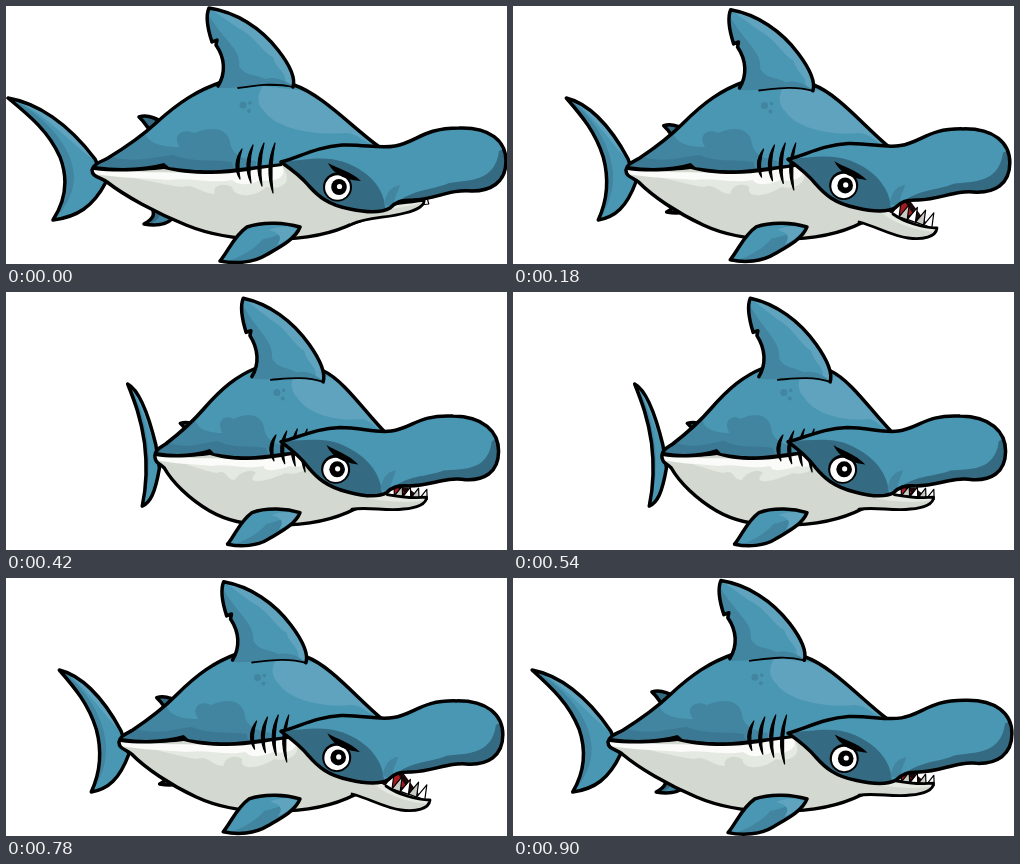
Animation of 501 by 258 pixels, one loop 0.96 s. Source, as an HTML page with a canvas:

```html
<!DOCTYPE html>
<html lang="en">
<head>
<meta charset="utf-8">
<title>Hammerhead</title>
<style>
html, body { margin: 0; width: 100%; height: 100%; overflow: hidden; background: #fff; }
canvas { display: block; }
</style>
</head>
<body>
<canvas id="stage" width="501" height="258"></canvas>
<script>
const ctx = document.getElementById('stage').getContext('2d');
const STEP = 60, STEPS = 16;
const MAIN = '#4a97b4', DARK = '#346b82', LIGHT = '#5fa3be', MID = '#4285a1';
const GREY = '#d3d9d0', SOFT = '#e4e9e1', PALE = '#fbfcfa', INK = '#000';
const OPENING = [0, .4, .85, 1, 1, 1, .85, .4, 0];

let s = 0;     // how far the body is turned, 0 to 8
let open = 0;  // how far the jaw is dropped, 0 to 1

const clamp = v => Math.max(0, Math.min(1, v));

function ramp(stops, x) {
  let i = 1;
  while (i < stops.length - 1 && x > stops[i][0]) i++;
  const [a, b] = stops[i - 1], [c, d] = stops[i];
  return b + (d - b) * (x - a) / (c - a);
}

// Sideways travel per step along the back and along the belly
const BACK = [[0, 17.2], [90, 8.6], [160, 6.5], [213, 4.9], [250, 4.8], [290, 4.2], [370, 1], [500, -1]];
const BELLY = [[90, 8.6], [137, 5.4], [165, 4], [215, 2], [260, .5], [500, -.5]];

const back = (x, y) => [x + s * ramp(BACK, x), y];
const body = (x, y) => {
  const t = clamp((y - 172) / 20);
  return [x + s * (ramp(BACK, x) * (1 - t) + ramp(BELLY, x) * t), y];
};
const tail = (x, y) => [x + s * (8.6 + (90 - x) * .0966), y];
const dorsal = (x, y) => [x + s * (4.9 - (x - 203) * .007), y + s * (.6 + (x - 203) * .008)];
const farTop = (x, y) => [x + s * 5.9, y + s * 2.9];
const farLow = (x, y) => [x + s * 5.2, y - s * 4];
const pectoral = (x, y) => [x + s * (294 - x) * .0135, y - s * .4 * clamp((y - 215) / 40)];
const head = (x, y) => [x - s * (x - 275) * .0047, y + s * (-.9 + (x - 275) * .0067)];

const PAIR = /(-?[\d.]+) (-?[\d.]+)/g;
const bend = (d, warp) => new Path2D(d.replace(PAIR, (_, x, y) => warp(+x, +y).join(' ')));

function blend(a, b, t) {
  const to = b.match(/-?[\d.]+/g);
  let i = 0;
  return new Path2D(a.replace(/-?[\d.]+/g, n => +n + (to[i++] - n) * t));
}

function fill(path, colour) {
  ctx.fillStyle = colour;
  ctx.fill(path);
}

function line(path, width) {
  ctx.lineWidth = width;
  ctx.strokeStyle = INK;
  ctx.stroke(path);
}

function part(outline, warp, colour, shades = [], edge = outline) {
  const path = bend(outline, warp);
  fill(path, colour);
  ctx.save();
  ctx.clip(path);
  for (const [d, c] of shades) fill(bend(d, warp), c);
  ctx.restore();
  line(bend(edge, warp), 3.5);
}

function drawTail() {
  part('M2 92 C31 97 62 117 89 153 L100 176 C87 201 71 211 47 214 C60 194 62 172 54 151 C43 126 24 110 2 92Z', tail, MAIN, [
    ['M0 90 C35 106 67 139 68 170 C68 190 58 204 44 218 L50 190 L50 150Z', MID],
    ['M14 96 C42 104 67 126 88 154 C65 137 43 112 14 96Z', LIGHT]
  ]);
}

function drawFarFins() {
  part('M133 111 C142 108 153 113 160 120 L150 130 C141 124 142 119 133 111Z', farTop, DARK);
  part('M145 200 L171 206 C166 217 154 221 138 218 C147 213 150 209 145 200Z', farLow, MID,
    [['M140 198 L156 200 C156 211 150 217 137 220Z', DARK]]);
}

function drawBody() {
  part('M86 164 C88 157 95 156 102 152 C120 141 137 129 150 117 C173 96 192 84 216 76 L288 79 C315 88 345 120 372 140 L400 170 L385 205 C372 208 359 213 348 217 C322 230 290 234 258 233 C227 233 202 228 180 219 C150 207 119 190 101 176 C94 171 86 171 86 164Z', body, MAIN, [
    ['M257 80 C250 90 251 99 259 106 C269 121 304 130 339 127 C352 127 360 138 375 143 L340 90Z', LIGHT],
    ['M84 166 L140 118 C134 135 152 141 174 141 C165 129 177 122 188 127 C208 119 222 123 224 136 C226 151 240 153 250 155 L250 172 L85 172Z', MID],
    ['M85 164 L102 150 C130 158 148 151 167 149 C188 157 209 153 226 156 L230 172 L85 172Z', '#3b7893'],
    ['M84 163 C120 167 143 163 158 160 C185 166 205 168 226 165 L276 158 L340 165 L410 200 L400 245 L80 245Z', GREY],
    ['M88 164 C125 168 188 166 226 166 L276 160 C289 178 274 184 260 181 C249 192 228 192 226 181 C215 176 206 180 209 188 C196 188 187 177 176 181 C157 179 128 171 88 164Z', SOFT],
    ['M88 163 C125 168 188 166 226 166 L276 160 C282 172 267 177 254 174 C246 179 233 180 226 174 C205 178 184 171 162 174 C138 172 113 172 88 168Z', PALE]
  ]);
  fill(bend('M88 160 C120 164 141 161 158 157 L163 161 C190 165 207 165 225 163 L276 157 L276 160 C250 163 230 168 205 168 C185 168 170 166 158 163 C140 165 110 167 88 164Z', back), INK);
  for (const [x, y, r] of [[237, 99, 3.5], [243, 105, 2], [244, 97, 1.8]]) {
    const [cx, cy] = back(x, y);
    ctx.beginPath();
    ctx.arc(cx, cy + s * .2, r, 0, 7);
    ctx.fillStyle = MID;
    ctx.fill();
  }
}

function drawGills() {
  for (const [x, y, h] of [[231, 143, 30], [242, 139, 38], [253, 137, 43], [264, 137, 50]]) {
    const slit = bend(`M${x + 5} ${y} Q${x - 6} ${y + h * .5} ${x + 3} ${y + h} Q${x} ${y + h * .5} ${x + 5} ${y}Z`,
      (px, py) => [px + s * ramp(BACK, x), py - s * (py - y) * .02]);
    fill(slit, INK);
    line(slit, 1.2);
  }
}

function drawDorsal() {
  const rim = 'M212 80 C220 67 219 52 210 39 L211 34 L206 36 C202 24 199 11 203 2 C230 6 255 22 272 44 C283 58 290 71 287 81';
  part(rim + ' C264 75 241 83 212 82Z', dorsal, MAIN, [
    ['M203 2 L260 20 L294 84 L279 78 C282 66 270 64 267 51 C256 46 249 30 232 22Z', LIGHT],
    ['M198 0 C212 31 236 42 233 60 C240 71 247 67 259 73 C271 70 280 75 290 82 L205 90Z', MID]
  ], rim);
  ctx.save();
  line(bend('M287 81 C267 76 248 80 232 82', dorsal), 1.8);
  ctx.restore();
}

function drawPectoral() {
  part('M214 255 C223 244 228 230 241 221 C258 215 280 217 294 221 C289 234 272 242 260 249 C247 257 229 258 214 255Z', pectoral, MAIN, [
    ['M208 260 C231 253 247 245 257 233 C267 232 275 226 296 224 L280 248 L240 264Z', MID],
    ['M263 224 C271 220 282 219 291 223 C287 230 280 235 271 239 C277 231 274 227 263 224Z', LIGHT]
  ]);
}

function drawMouth() {
  fill(blend('M360 203 L390 195 L404 195 L413 196 L386 200Z',
    'M366 201 L388 194 L398 196 L415 219 L388 213Z', open), '#1c0808');
  fill(blend('M380 198 L390 195 L398 195 L390 198Z', 'M382 203 L392 196 L400 208 L389 211Z', open), '#a51c20');

  for (let i = 0; i < 5; i++) {
    const x = 380 + i * 8.2, y = 208 + i * 2.7;
    const tooth = blend(`M${x + 2} 199 L${x + 8} 191 L${x + 10} 198Z`,
      `M${x - 2} ${y} L${x + 8} ${y - 12} L${x + 6} ${y + 3}Z`, open);
    fill(tooth, i % 2 ? '#c9cbc5' : '#fff');
    line(tooth, 1.2);
  }

  const top = 'C361 211 382 212 399 207 C412 204 419 199 418 194 C406 196 392 197 382 199';
  const drop = 'C362 220 379 230 395 232 C410 234 423 231 424 222 C410 222 391 216 380 208';
  const jaw = blend(`M346 218 ${top} L355 203 L335 214`, `M346 216 ${drop} L367 202 L335 212`, open);
  fill(jaw, GREY);
  ctx.save();
  ctx.clip(jaw);
  ctx.lineWidth = 5;
  ctx.strokeStyle = SOFT;
  ctx.stroke(blend('M362 205 C382 200 402 199 418 194', 'M369 204 C388 219 408 222 424 224', open));
  ctx.restore();
  line(blend(`M346 218 ${top}`, `M346 216 ${drop}`, open), 2.8);
}

function drawEye() {
  const [x, y] = head(331.5, 181);
  const disc = (dx, dy, rx, ry, colour) => {
    ctx.beginPath();
    ctx.ellipse(x + dx, y + dy, rx, ry, 0, 0, 7);
    ctx.fillStyle = colour;
    ctx.fill();
  };
  disc(0, 0, 14.5, 14.5, INK);
  disc(0, .5, 12.4, 12.2, '#fff');
  disc(1.5, 0, 7.8, 8, INK);
  disc(2, -.5, 2.6, 2.6, '#fff');
  fill(bend('M322 157 C330 162 345 165 355 175 C343 174 329 171 322 157Z', head), INK);
}

function drawHead() {
  part('M275 156 C294 151 310 141 336 139 C358 138 373 143 389 140 C411 136 417 122 453 122 C484 121 500 135 500 155 C500 177 484 185 466 185 C443 183 431 193 407 194 C395 194 390 196 384 202 C374 208 358 206 344 203 C322 199 312 190 303 180 C295 170 285 163 275 156Z', head, MAIN, [
    ['M270 156 C299 154 318 149 338 156 C360 164 374 178 378 194 L381 212 L310 212Z', DARK],
    ['M378 199 C380 186 385 181 394 179 C392 186 388 191 388 201Z', MID],
    ['M384 202 C405 182 425 185 443 177 C463 174 489 176 493 145 L505 140 L500 195 L440 202Z', DARK]
  ]);
  drawEye();
}

function draw() {
  ctx.clearRect(0, 0, 501, 258);
  drawFarFins();
  drawTail();
  drawBody();
  drawDorsal();
  drawGills();
  drawMouth();
  drawHead();
  drawPectoral();
}

ctx.lineJoin = 'round';
ctx.lineCap = 'round';
const start = performance.now();
let shown = -1;

function tick() {
  const n = Math.floor((performance.now() - start) / STEP) % STEPS;
  if (n !== shown) {
    shown = n;
    s = Math.min(n, STEPS - n);
    open = OPENING[s];
    draw();
  }
  requestAnimationFrame(tick);
}

tick();
</script>
</body>
</html>
```
